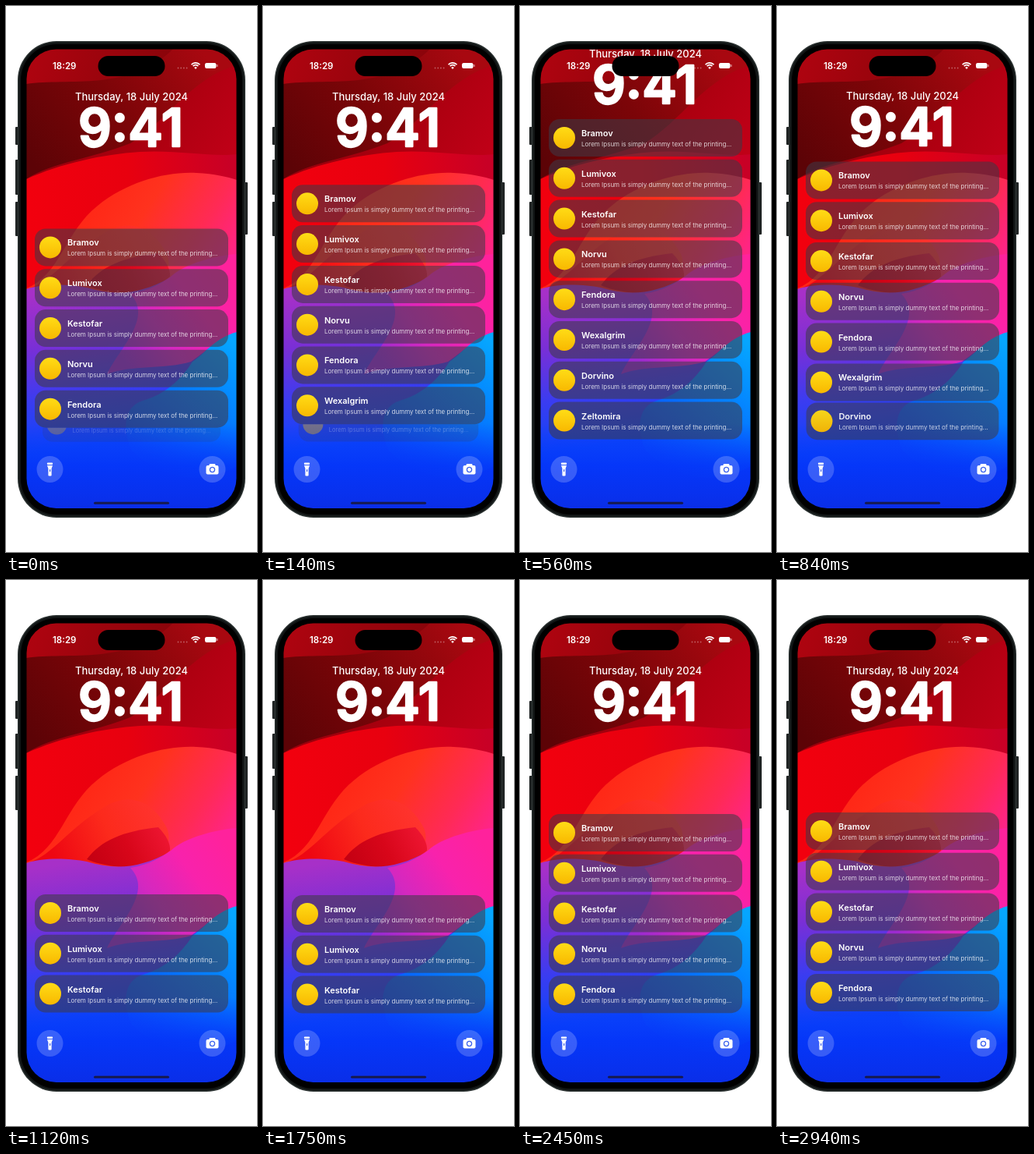
Recreate the animation shown at these times as an HTML page with a canvas. Size 323x700 px, loop 3000 ms.

```html
<!DOCTYPE html>
<html lang="en">
<head>
<meta charset="utf-8">
<title>Lock screen notifications</title>
<style>
html, body { margin: 0; width: 100%; height: 100%; overflow: hidden; background: #fff; }
canvas { display: block; width: 323px; height: 700px; }
</style>
</head>
<body>
<canvas id="stage"></canvas>
<script>
const W = 323, H = 700, LOOP = 3000, STEP = 70;
const FONT = 'Inter, "Open Sans", sans-serif';
const PITCH = 51.8, CARD_H = 48, LAST = 508, PIN = 200;
const names = ['Bramov', 'Lumivox', 'Kestofar', 'Norvu', 'Fendora', 'Wexalgrim', 'Dorvino', 'Zeltomira'];
const blurb = 'Lorem Ipsum is simply dummy text of the printing...';

const canvas = document.getElementById('stage');
const dpr = window.devicePixelRatio || 1;
canvas.width = W * dpr;
canvas.height = H * dpr;
const c = canvas.getContext('2d');

function box(x, y, w, h, r, fill, g = c) {
  g.beginPath();
  g.roundRect(x, y, w, h, r);
  g.fillStyle = fill;
  g.fill();
}

function disc(x, y, r, fill) {
  c.beginPath();
  c.arc(x, y, r, 0, Math.PI * 2);
  c.fillStyle = fill;
  c.fill();
}

function text(str, x, y, size, weight, fill = '#fff', align = 'left') {
  c.font = `${weight} ${size}px ${FONT}`;
  c.textAlign = align;
  c.textBaseline = 'alphabetic';
  c.fillStyle = fill;
  c.fillText(str, x, y);
}

function ramp(g, x0, y0, x1, y1, ...colors) {
  const grad = g.createLinearGradient(x0, y0, x1, y1);
  colors.forEach((col, i) => grad.addColorStop(i / (colors.length - 1), col));
  return grad;
}

function makeWallpaper() {
  const cv = document.createElement('canvas');
  cv.width = W * dpr;
  cv.height = H * dpr;
  const g = cv.getContext('2d');
  g.scale(dpr, dpr);
  const shape = (d, fill) => { g.fillStyle = fill; g.fill(new Path2D(d)); };

  g.fillStyle = ramp(g, 60, 80, 290, 230, '#8c0009', '#a8000e', '#c40019');
  g.fillRect(0, 0, W, H);
  // dark folds at the top
  shape('M26 55H297V76C240 90 205 150 160 176C110 196 60 200 26 222Z',
    ramp(g, 40, 210, 250, 55, '#5c0306', '#7c0508', '#a80810'));
  shape('M26 100C80 92 160 110 215 55H26Z', ramp(g, 26, 55, 200, 110, '#b00410', '#8a040a'));
  // red sweep
  shape('M26 222C70 202 125 190 172 187C220 184 265 194 297 190V420H26Z',
    ramp(g, 26, 230, 290, 215, '#f2000e', '#e8000f', '#c80026'));
  // orange to pink dune
  shape('M26 362C70 345 75 290 118 256C155 226 205 212 245 214C268 215 285 219 297 223V440H26Z',
    ramp(g, 100, 250, 285, 370, '#ff2615', '#ff321e', '#ff2a55', '#ff229c'));
  shape('M26 364C62 352 78 320 125 292C160 270 190 285 207 318C216 340 200 362 165 368Z',
    ramp(g, 60, 350, 200, 290, '#ee0712', '#fc2a1c', '#ff3430'));
  shape('M104 358C122 334 150 322 196 317C206 327 212 338 211 347C196 361 172 369 148 368C128 366 112 362 104 358Z',
    ramp(g, 110, 365, 205, 320, '#c40012', '#d8061a', '#ee1632'));
  // purple wave fading into blue
  shape('M26 363C50 355 82 357 104 361C140 372 172 370 212 348C236 348 262 370 297 372V645H26Z',
    ramp(g, 100, 360, 130, 560, '#a730c8', '#7a2fd6', '#3b3cf0', '#0c45fa'));
  shape('M160 369C185 365 200 355 212 347C230 330 270 320 297 318V420C270 428 255 445 238 456C205 466 160 460 130 472C145 440 190 400 160 369Z',
    ramp(g, 145, 445, 285, 340, '#9a2bd0', '#d428c0', '#f822ac', '#ff229c'));
  shape('M297 418C268 426 258 444 240 456C226 478 205 498 176 506C150 514 150 545 162 570C210 615 260 610 297 590Z',
    ramp(g, 285, 425, 170, 570, '#06a6ff', '#0488ff', '#0768fe', '#0b4afa'));
  g.fillStyle = ramp(g, 0, 535, 0, 644, 'rgba(6,60,250,0)', 'rgba(4,52,248,.85)', '#0a2ee8');
  g.fillRect(0, 535, W, 110);
  return cv;
}

const wallpaper = makeWallpaper();

function ease(t, start, span) {
  const u = Math.min(1, Math.max(0, (t - start) / span));
  return u * u * (3 - 2 * u);
}

// Top of the first card
function listTop(t) {
  const s = t > 2800 ? t - LOOP : t;
  if (s < 600) return 300 - 155 * ease(s, -94, 497);
  if (s < 1500) return 145 + 259 * ease(s, 716, 420);
  return 404 - 104 * ease(s, 1858, 497);
}

function drawCard(name, y, prevBottom) {
  const over = Math.max(0, y - LAST);
  if (over >= 50) return;
  const scale = 1 - over * 0.0022;
  const top = Math.min(y, LAST) + over * 0.13;
  c.save();
  if (over) {
    c.beginPath();
    c.rect(26, prevBottom, 272, 120);
    c.clip();
  }
  c.globalAlpha = 1 - over / 50;
  c.translate(161.5, top + CARD_H / 2);
  c.scale(scale, scale);
  c.translate(-161.5, -CARD_H / 2);
  box(37, 0, 249, CARD_H, 14, 'rgba(62,58,70,.56)');
  disc(57, 24, 14, ramp(c, 0, 10, 0, 38, '#ffdc16', '#f8b800'));
  text(name, 79, 22, 11, 600);
  text(blurb, 79, 35, 8, 400, 'rgba(255,255,255,.78)');
  c.restore();
}

function drawHeader(shift) {
  c.save();
  c.translate(0, shift);
  text('Thursday, 18 July 2024', 161.5, 120.5, 13, 500, '#fff', 'center');
  text('9:41', 160.5, 179.5, 67, 600, '#fff', 'center');
  c.lineJoin = 'round';
  c.lineWidth = 2.4;
  c.strokeStyle = '#fff';
  c.strokeText('9:41', 160.5, 179.5);
  c.restore();
}

function drawStatus() {
  box(118.5, 64, 86, 26, 13, '#000');
  text('18:29', 60, 81, 11.5, 600);
  for (let i = 0; i < 4; i++) disc(221.5 + i * 3.7, 79.5, 0.9, 'rgba(255,255,255,.35)');
  c.strokeStyle = '#fff';
  c.lineWidth = 1.7;
  for (const r of [4.4, 7.2]) {
    c.beginPath();
    c.arc(244, 80, r, -Math.PI * 0.77, -Math.PI * 0.23);
    c.stroke();
  }
  c.beginPath();
  c.moveTo(244, 81);
  c.arc(244, 80.5, 2.4, -Math.PI * 0.77, -Math.PI * 0.23);
  c.fillStyle = '#fff';
  c.fill();
  box(256, 73, 14.5, 7, 2.2, '#fff');
  box(271.3, 75, 1.2, 3, 0.6, 'rgba(255,255,255,.6)');
}

function drawButtons() {
  const glass = 'rgba(255,255,255,.2)';
  disc(56.5, 594, 17, glass);
  box(53, 585.5, 7, 2.5, 0.8, '#fff');
  c.fillStyle = '#fff';
  c.fill(new Path2D('M53 589H60L58.6 593V601.5Q58.6 602.5 57.6 602.5H55.4Q54.4 602.5 54.4 601.5V593Z'));
  box(56, 594, 1.2, 3, 0.6, '#3a5ce8');

  disc(265.5, 594, 17, glass);
  box(257.5, 589, 16, 11.5, 2, '#fff');
  box(261.5, 587, 8, 4, 1.4, '#fff');
  disc(265.5, 594.5, 3.7, '#3c62ec');
  disc(265.5, 594.5, 2.4, '#fff');
  box(113, 635.8, 97, 3, 1.5, '#171a4e');
}

function drawBody() {
  for (const [x, y, h] of [[12, 155, 23], [12, 197, 45], [12, 251, 44], [306, 226, 67]]) {
    box(x, y, 5, h, 1, '#202424');
  }
  box(15, 45, 293, 611, 50, '#2b3231');
  box(16.5, 46.5, 290, 608, 48.5, '#111515');
  box(19, 49, 285, 603, 46, '#000');
}

function draw(t) {
  c.setTransform(dpr, 0, 0, dpr, 0, 0);
  c.fillStyle = '#fff';
  c.fillRect(0, 0, W, H);
  drawBody();
  c.save();
  c.beginPath();
  c.roundRect(26.5, 55.5, 270, 588.5, 38);
  c.clip();
  c.drawImage(wallpaper, 0, 0, W, H);
  const top = listTop(t);
  drawHeader(Math.min(0, top - PIN));
  names.forEach((name, i) => {
    const y = top + i * PITCH;
    drawCard(name, y, y - PITCH + CARD_H);
  });
  drawStatus();
  drawButtons();
  c.restore();
}

const begin = performance.now();
function tick() {
  const t = (performance.now() - begin) % LOOP;
  draw(Math.floor(t / STEP) * STEP);
  requestAnimationFrame(tick);
}
tick();
</script>
</body>
</html>
```
